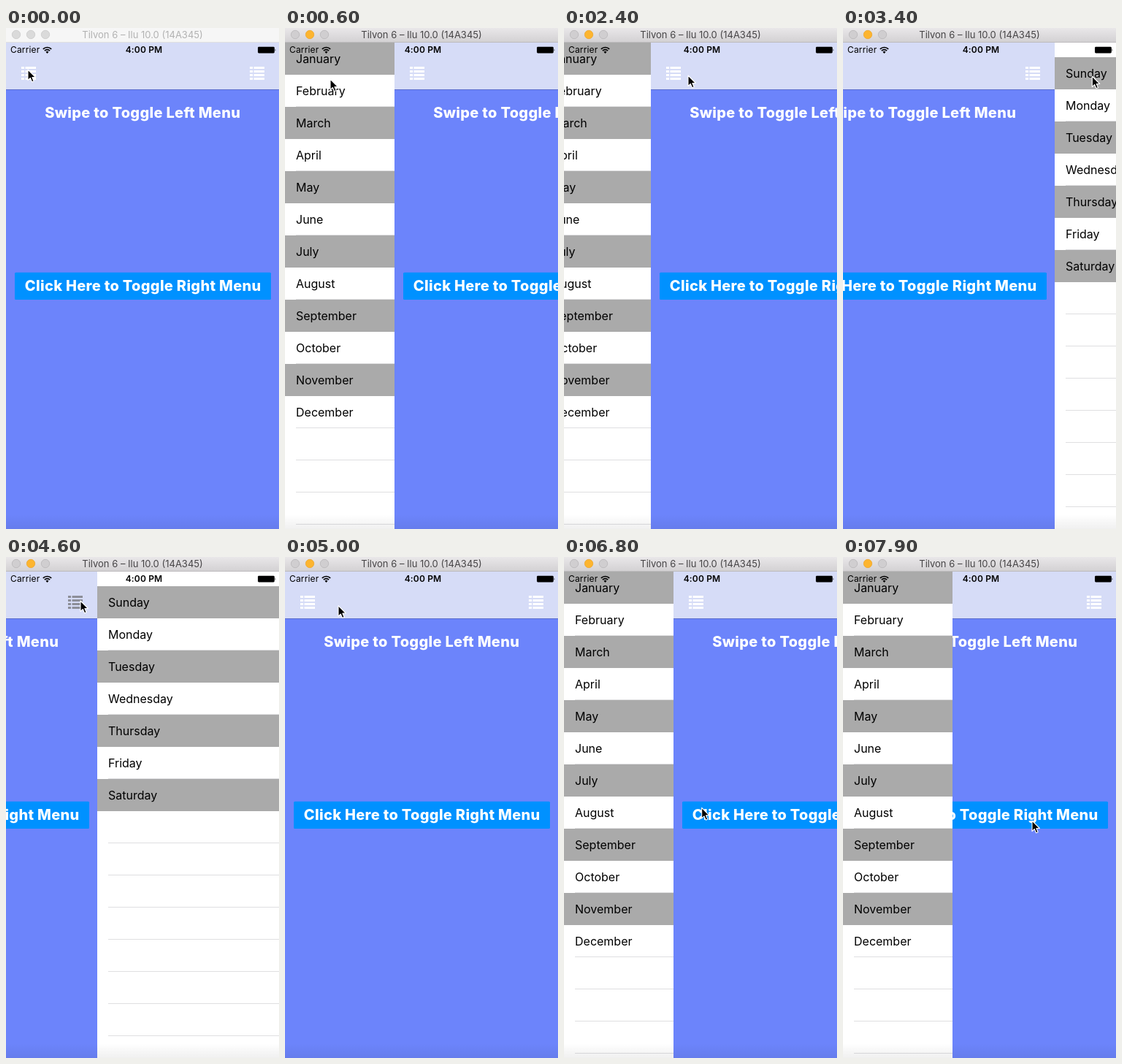
An HTML page that plays this animation: 374x686 px, repeating every 8000 ms.

```html
<!DOCTYPE html>
<html lang="en">
<head>
<meta charset="utf-8">
<title>Side menus</title>
<style>
  html, body { margin: 0; width: 100%; height: 100%; overflow: hidden; background: #fff; }
  svg { display: block; width: 100vw; height: 100vh; }
  text { font-family: Inter, Roboto, "Open Sans", sans-serif; }
  .big { font-size: 20px; font-weight: 800; letter-spacing: .3px; fill: #fff; text-anchor: middle; }
  .row { font-size: 16px; fill: #000; }
  .status { font-size: 12px; letter-spacing: .15px; }
</style>
</head>
<body>
<svg id="stage" viewBox="0 0 374 686" preserveAspectRatio="none">
  <defs>
    <linearGradient id="bar" x2="0" y2="1">
      <stop stop-color="#e9e7e9"/><stop offset="1" stop-color="#d2d0d2"/>
    </linearGradient>
    <linearGradient id="foot" x2="0" y2="1">
      <stop stop-color="#000" stop-opacity="0"/><stop offset="1" stop-color="#000" stop-opacity=".06"/>
    </linearGradient>
    <g id="list">
      <path d="M0 1.5h4M0 6.5h4M0 11.5h4M0 16.5h4M5.5 1.5H20M5.5 6.5H20M5.5 11.5H20M5.5 16.5H20" stroke-width="3"/>
    </g>
  </defs>

  <rect y="20" width="374" height="666" fill="#fff"/>
  <g id="panel">
    <rect y="20" width="374" height="666" fill="#6c84fb"/>
    <rect y="20" width="374" height="64" fill="#d6dcf7"/>
    <rect y="84" width="374" height="1" fill="#5b6dcc"/>
    <use href="#list" x="21" y="53" stroke="#fff"/>
    <use id="rightIcon" href="#list" x="334" y="53" stroke="#fff"/>
    <text class="big" x="187.2" y="123">Swipe to Toggle Left Menu</text>
    <rect x="12" y="334.7" width="351" height="37.3" rx="1.5" fill="#0091ff"/>
    <text class="big" x="187.7" y="360.4">Click Here to Toggle Right Menu</text>
  </g>
  <g id="leftMenu"></g>
  <g id="rightMenu"></g>

  <rect y="666" width="374" height="20" fill="url(#foot)"/>

  <g class="status">
    <text x="6" y="34.3">Carrier</text>
    <text x="189" y="34.3" text-anchor="middle" font-weight="600">4:00 PM</text>
    <g fill="none" stroke="#000" stroke-width="1.7">
      <path d="M50.8 28.9a8 8 0 0 1 11.4 0M52.9 31.2a5 5 0 0 1 7.2 0"/>
    </g>
    <path d="M54.5 32.7a2.9 2.9 0 0 1 4 0L56.5 35z"/>
    <rect x="345" y="25.8" width="22.8" height="8.6" rx="1.4"/>
    <path d="M368.6 28.4q1.7 1.6 0 3.3z"/>
  </g>

  <rect id="titleBar" width="374" height="20"/>
  <rect id="titleLine" y="19" width="374" height="1"/>
  <g id="dots" stroke-width=".8">
    <circle cx="14" cy="9" r="5.7"/><circle cx="34" cy="9" r="5.7"/><circle cx="54" cy="9" r="5.7"/>
  </g>
  <text id="title" x="187" y="14" font-size="13" text-anchor="middle">Tilvon 6 – Ilu 10.0 (14A345)</text>

  <path id="cursor" d="M0 0V14.6L3.3 11.5L5.6 16.8L8.1 15.7L5.9 10.5H10.4Z"
        fill="#000" stroke="#fff" stroke-width="1.1" stroke-linejoin="round"/>
</svg>
<script>
const LOOP = 8000, STEP = 100, SLIDE = 300;
const LEFT_OPEN = 150, RIGHT_OPEN = -249, WIDTH = 374;
const el = id => document.getElementById(id);
const set = (node, attrs) => {
  for (const key in attrs) node.setAttribute(key, attrs[key]);
};

function add(parent, tag, attrs, text) {
  const node = document.createElementNS("http://www.w3.org/2000/svg", tag);
  set(node, attrs);
  if (text) node.textContent = text;
  parent.appendChild(node);
}

function buildMenu(menu, names, top, width) {
  add(menu, "rect", { y: 20, width, height: 666, fill: "#fff" });
  for (let i = 0, y = top; y < 686; i++, y += 44) {
    const filled = i < names.length;
    if (filled && i % 2 === 0) add(menu, "rect", { y, width, height: 44, fill: "#aaa" });
    else add(menu, "rect", { x: 15, y: y + 43, width: width - 15, height: 1, fill: "#dfdfe1" });
    if (filled) add(menu, "text", { class: "row", x: 15, y: y + 27.8 }, names[i]);
  }
}

buildMenu(el("leftMenu"), ["January", "February", "March", "April", "May", "June", "July",
  "August", "September", "October", "November", "December"], 20, LEFT_OPEN);
buildMenu(el("rightMenu"), ["Sunday", "Monday", "Tuesday", "Wednesday", "Thursday",
  "Friday", "Saturday"], 40, -RIGHT_OPEN);

// Each slide: start time and the panel position it ends at.
const slides = [
  [270, LEFT_OPEN], [2303.5, 0], [3277, RIGHT_OPEN],
  [4640, 0], [5653, LEFT_OPEN], [7335, 0]
];
// From here the open left menu stays put while the panel slides beneath it.
const MENU_STAYS = 7335;

// Pointer stops: time, x, y.
const stops = [
  [0, 30, 57], [300, 30, 57], [600, 62, 70], [1100, 147, 139], [1600, 267, 173],
  [1700, 267, 173], [2250, 170, 65], [2600, 170, 65], [3200, 342, 66], [3500, 341, 66],
  [4300, 102, 60], [4800, 102, 60], [5400, 15, 80], [5500, 15, 80], [5800, 50, 80],
  [5950, 85, 85], [6300, 291, 393], [6600, 268, 360], [6700, 268, 360],
  [7000, 30, 310], [7300, 259, 363], [7900, 259, 361]
];

const smooth = p => p < .5 ? 2 * p * p : 1 - 2 * (1 - p) * (1 - p);

function panelX(t) {
  let x = 0;
  for (const [start, end] of slides) {
    if (t < start) break;
    x += (end - x) * smooth(Math.min(1, (t - start) / SLIDE));
  }
  return x;
}

function pointer(t) {
  const i = stops.findIndex(s => s[0] > t);
  if (i < 0) return stops[stops.length - 1].slice(1);
  const [t0, x0, y0] = stops[i - 1], [t1, x1, y1] = stops[i];
  const p = (t - t0) / (t1 - t0);
  return [x0 + (x1 - x0) * p, y0 + (y1 - y0) * p];
}

function move(id, x, y = 0) {
  set(el(id), { transform: `translate(${x} ${y})` });
}

function drawTitle(active) {
  set(el("titleBar"), { fill: active ? "url(#bar)" : "#f6f6f6" });
  set(el("titleLine"), { fill: active ? "#bdbbbd" : "#e0e0e0" });
  set(el("title"), { fill: active ? "#464446" : "#b2b2b2" });
  [...el("dots").children].forEach((dot, i) => {
    const amber = active && i === 1;
    set(dot, {
      fill: amber ? "#fdb52f" : active ? "#d0ced0" : "#dadada",
      stroke: amber ? "#eca62e" : active ? "#b9b7b9" : "#cacaca"
    });
  });
}

function draw(t) {
  const x = Math.round(panelX(t));
  move("panel", x);
  move("leftMenu", t >= MENU_STAYS ? 0 : Math.min(x, LEFT_OPEN) - LEFT_OPEN);
  move("rightMenu", WIDTH + Math.min(x, 0));
  move("cursor", ...pointer(t));
  set(el("rightIcon"), { stroke: t >= 4600 && t < 4700 ? "#8d8f99" : "#fff" });
  drawTitle(t >= 300);
}

function tick() {
  const t = performance.now() % LOOP;
  draw(Math.floor(t / STEP) * STEP);
  requestAnimationFrame(tick);
}
tick();
</script>
</body>
</html>
```
